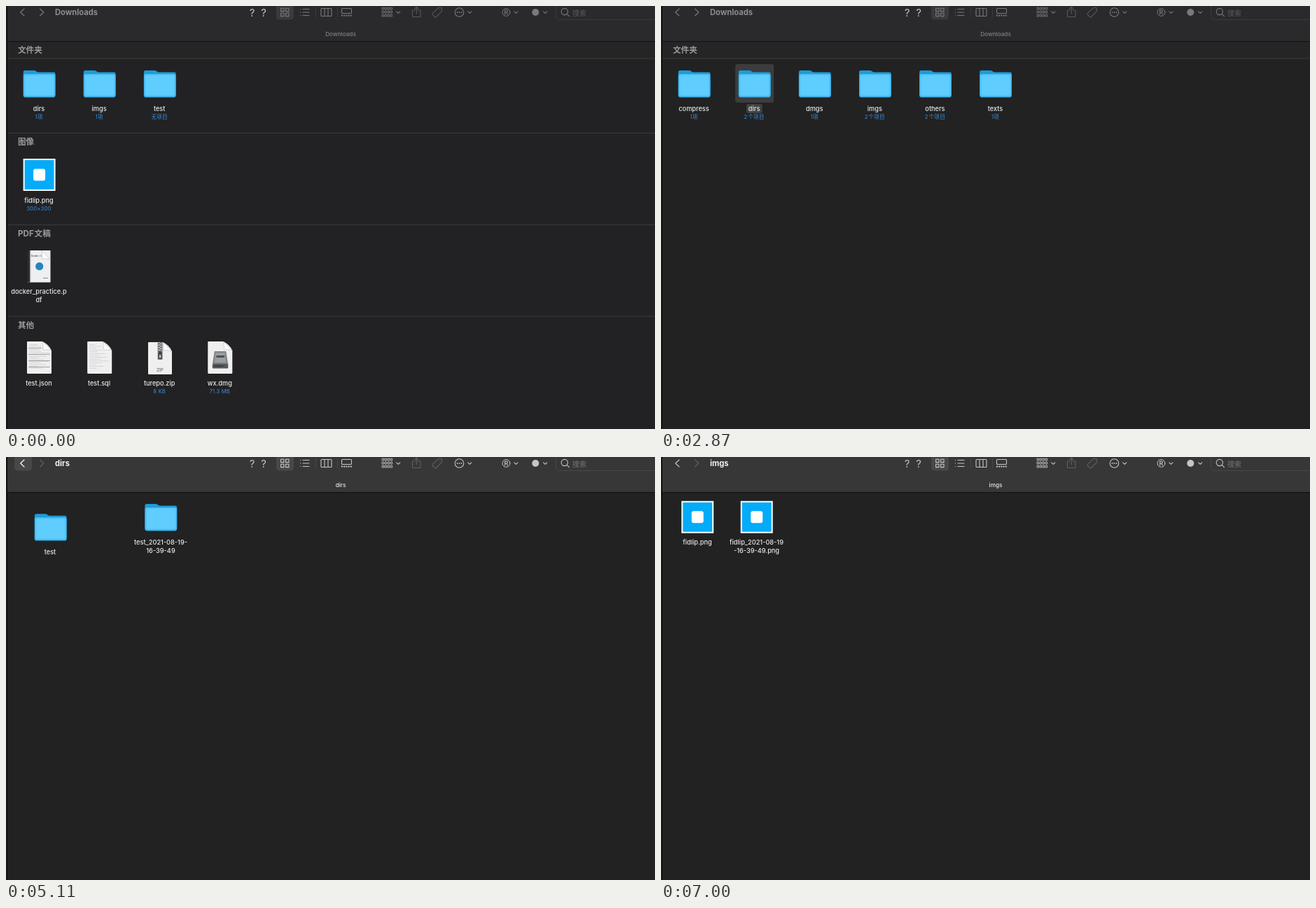
An HTML page that plays this animation: 927 px wide and 604 px high, repeating every 8000 ms.

```html
<!DOCTYPE html>
<html lang="zh-CN">
<head>
<meta charset="utf-8">
<style>
html, body { margin: 0; width: 100%; height: 100%; overflow: hidden; background: #222; }
svg { display: block; --bar: #2a2a2c; --ink: #7a7a7c; --title: #8c8c8e; --path: #808082; --off: #58585a; --box: #3a3a3c; --rule: #3b3b3d; --hint: #5a5a5c; }
svg.active { --bar: #373737; --ink: #c6c6c6; --title: #f2f2f2; --path: #e8e8e8; --off: #616161; --box: #484848; --rule: #484848; --hint: #757575; }
text { font: 500 9.2px Inter, "Noto Sans CJK SC", "Noto Sans CJK", sans-serif; fill: #e9e9e9; }
.mid { text-anchor: middle; }
.sub { font-size: 7.7px; font-weight: 400; letter-spacing: .15px; fill: #3a8ee0; }
.head { font-size: 11.6px; font-weight: 700; fill: #9b9b9b; }
.title { font-size: 11.2px; font-weight: 700; fill: var(--title); }
.path { font-size: 8.2px; fill: var(--path); }
.ask { font-size: 15px; font-weight: 400; fill: #c4c4c4; }
.hint { font-size: 10px; font-weight: 400; fill: var(--hint); }
.tiny { font-size: 3px; fill: #333; }
.icon { fill: none; stroke: var(--ink); stroke-width: 1.1; stroke-linecap: round; stroke-linejoin: round; }
.off { stroke: var(--off); }
.solid { fill: var(--ink); stroke: none; }
</style>
</head>
<body>
<svg id="stage" width="927" height="604" viewBox="0 0 927 604"></svg>
<script>
const stage = document.getElementById('stage');
const LOOP = 8000;
const colX = i => 47 + 86.1 * i;

const rect = (x, y, w, h, fill, r = 0) =>
  `<rect x="${x}" y="${y}" width="${w}" height="${h}" rx="${r}" fill="${fill}"/>`;
const text = (x, y, s, cls = 'mid') => `<text x="${x}" y="${y}" class="${cls}">${s}</text>`;
const icon = (d, cls = '') => `<path class="icon ${cls}" d="${d}"/>`;
const at = (x, y, s) => `<g transform="translate(${x} ${y})">${s}</g>`;
const repeat = (n, f) => Array.from({ length: n }, (_, i) => f(i)).join('');

// Icons are drawn from their own top left corner.
const folder = (x, y) => at(x, y,
  `<path d="M0 35V2.5Q0 0 2.5 0H15Q17 0 18.5 1.3T22 2.6H43.3Q45.8 2.6 45.8 5V35Z" fill="#1f9bd6"/>` +
  rect(0, 5, 45.8, 33.4, '#35a8e2', 2.8) +
  rect(.4, 5, 45, 32.6, '#48b9f0', 2.6) +
  rect(1.4, 6, 43, 30.6, '#56c5f9', 2.4) +
  rect(2.6, 7.2, 40.6, 28.2, '#5fceff', 2));

const picture = (x, y) => at(x, y,
  rect(0, 0, 46, 46, '#f4f8fa') + rect(2.1, 2.1, 41.8, 41.8, '#03abf9') +
  rect(14.5, 14.5, 17, 17, '#fff', 3));

const curl = w => `<path d="M${w - 13} 0Q${w - 11} 8 ${w - 12} 12Q${w - 5} 11 ${w} 13Z" fill="#fdfdfd" stroke="#bbb" stroke-width=".6"/>`;

const page = (x, y, inner, w = 35) => at(x, y,
  `<path d="M0 1Q0 0 1 0H${w - 13}Q${w - 4} 4 ${w} 13V45Q${w} 46 ${w - 1} 46H1Q0 46 0 45Z" fill="#efefef"/>` +
  inner + curl(w));

const lines = (gap, color, width) => repeat(Math.floor(38 / gap), i => {
  const y = 4 + i * gap;
  const room = y < 14 ? 17 : 29;
  return rect(3, y, Math.min(room, width(i)), .8, color);
});

const jsonDoc = (x, y) => page(x, y,
  lines(2.4, '#cfcbcb', i => 12 + i * 7 % 18) + repeat(4, i => rect(2, 9 + i * 9, i ? 31 : 19, .9, '#a09c9c')));
const sqlDoc = (x, y) => page(x, y, lines(2.6, '#cfccd2', i => 8 + i * 11 % 20));

const zipDoc = (x, y) => page(x, y,
  rect(13.6, 0, 7, 25, '#777', 1) +
  repeat(10, i => rect(i % 2 ? 17 : 14.4, i * 1.8, 2.8, 1, '#d4d4d4')) +
  rect(14.6, 13, 5, 11, '#444', 1.5) + rect(16, 18, 2.2, 4.5, '#ccc', 1) +
  `<text x="17" y="41.5" class="mid" style="font-size:6.5px;fill:#707070">ZIP</text>`, 34);

const diskDoc = (x, y) => page(x, y,
  `<path d="M9.5 14H26L29 33H6.5Z" fill="#7f8386"/>` +
  `<path d="M11 16H24.5L26 30H9.5Z" fill="#9a9ea1"/>` +
  rect(12, 20, 12, 3, '#4c5054', 1) + rect(6.5, 32, 22.5, 6.5, '#55595c', 1.5) +
  rect(9, 34.5, 13, 1.2, '#2e3133'));

const book = (x, y) => at(x, y,
  rect(0, 0, 32.5, 45.6, '#eeeff0') +
  rect(0, 0, 3.5, 45.6, '#2c2e30') + rect(3.5, 0, .8, 45.6, '#bbb') +
  text(5, 9, 'Docker 入门', 'tiny') +
  `<circle cx="16.7" cy="22.7" r="5.6" fill="#2585bd"/>` +
  rect(22, 39, 7, 1, '#888') + curl(32.5));

const label = (x, y, name, sub) => text(x, y, name) + (sub ? text(x, y + 11.2, sub, 'mid sub') : '');

const folders = (list, picked, tint) => list.map(([name, sub], i) => {
  const x = colX(i), on = name === picked;
  return (on ? rect(x - 27, 83, 55, 55, '#3c3c3c', 3) + rect(x - 11, 140, 22.5, 13, tint, 2.5) : '') +
    folder(x - 22.3, 92) + label(x, 150, name, sub);
}).join('');

const header = rect(2, 51, 925, 24, '#252525') + rect(2, 74.5, 925, 1, '#3c3c3c') + text(17, 67, '文件夹', 'head');
const section = (y, name) => rect(2, y, 925, 1, '#3a3a3a') + text(17, y + 17, name, 'head');

const files =
  section(181, '图像') + picture(24.6, 218) + label(47, 280.5, 'fidlip.png', '300×300') +
  section(312, 'PDF\u200a文稿') + book(31, 349) + text(47, 411, 'docker_practice.p') + text(47, 423, 'df') +
  section(442.5, '其他') +
  jsonDoc(30, 479) + label(47, 542, 'test.json') +
  sqlDoc(116.2, 479) + label(133, 542, 'test.sql') +
  zipDoc(203, 480) + label(219.2, 542, 'turepo.zip', '8 KB') +
  diskDoc(288.3, 479) + label(305.3, 542, 'wx.dmg', '71.3 MB');

const down = x => icon(`M${x - 2.6} 7.8l2.6 2.6l2.6 -2.6`);

function toolbar({ title, press, glow, noForward, usable }) {
  const off = usable ? '' : 'off';
  return rect(0, 0, 927, 50.2, 'var(--bar)') + rect(0, 50.2, 927, 1, '#101010') +
    (press ? rect(12, -4, 25, 23.5, 'var(--box)', 4.5) : '') +
    `<g${glow ? ' style="--ink:#fff"' : ''}>${icon('M26 4l-5.3 5l5.3 5')}</g>` +
    icon('M48.5 4l5.3 5l-5.3 5', noForward ? 'off' : '') +
    text(70, 13, title, 'title') +
    text(351.5, 14.8, '?', 'mid ask') + text(368, 14.8, '?', 'mid ask') +
    rect(386, -4, 25, 23.5, 'var(--box)', 4.5) +
    icon('M392.6 3.2h4.4v4.4h-4.4zM399.6 3.2h4.4v4.4h-4.4zM392.6 10.2h4.4v4.4h-4.4zM399.6 10.2h4.4v4.4h-4.4z') +
    icon('M420.5 4.5h.2M424 4.5h9M420.5 9h.2M424 9h9M420.5 13.5h.2M424 13.5h9') +
    rect(442, 2, 1, 14, 'var(--rule)') + rect(473, 2, 1, 14, 'var(--rule)') +
    icon('M451 3.5h13q1 0 1 1v9q0 1 -1 1h-13q-1 0 -1 -1v-9q0 -1 1 -1zM455 3.5v11M460 3.5v11') +
    icon('M480.5 3.5h12q1 0 1 1v5q0 1 -1 1h-12q-1 0 -1 -1v-5q0 -1 1 -1z') +
    repeat(5, i => `<rect class="solid" x="${479 + i * 3.2}" y="12.6" width="2" height="2"/>`) +
    repeat(12, i => `<rect class="icon" style="stroke-width:.9" x="${537.5 + i % 4 * 4}" y="${2.2 + (i >> 2) * 5}" width="2.2" height="2.8"/>`) +
    down(560.3) +
    icon('M584 6h-2.5q-1 0 -1 1v7.5q0 1 1 1h9.5q1 0 1 -1v-7.5q0 -1 -1 -1h-2.5M586.3 11v-9.5M583.6 4l2.7 -2.6l2.7 2.6', off) +
    icon('M609.3 10.4l7.6 -7.3q.6 -.6 1.4 -.6h3.2q1 0 1 1v3.2q0 .8 -.6 1.4l-7.4 7.4q-1 .9 -2 0l-3.2 -3.2q-.9 -1 0 -1.9zM619.6 5.3h.2', off) +
    '<circle class="icon" cx="647.5" cy="9" r="6.3"/>' +
    repeat(3, i => `<circle class="solid" cx="${644.5 + i * 3}" cy="9" r=".9"/>`) + down(662.3) +
    '<circle class="icon" style="stroke-width:1" cx="714.5" cy="9" r="5.4"/>' +
    icon('M712.7 12v-6h2q1.8 0 1.8 1.6t-1.8 1.6h-2m2 0l1.9 2.8') + down(728.5) +
    '<circle class="solid" cx="756.3" cy="9" r="5"/>' + down(770.2) +
    '<rect x="785.5" y="-8.5" width="160" height="28" rx="5" fill="none" stroke="var(--rule)"/>' +
    '<circle class="icon" cx="797.8" cy="8" r="4.6"/>' + icon('M801.2 11.4l3.2 3.3') +
    text(809, 13.6, '搜索', 'hint') +
    text(478, 43, title, 'mid path');
}

const one = '1项', two = '2\u200a个项目';
const first = [['dirs', one], ['imgs', one], ['test', '无项目']];
const sorted = [['compress', one], ['dirs', one], ['dmgs', one], ['imgs', one], ['others', two], ['test', '无项目'], ['texts', one]];
const moved = sorted.filter(([name]) => name !== 'test');
const counted = moved.map(([name, sub]) => [name, /dirs|imgs/.test(name) ? two : sub]);

const GRAY = '#434343', BLUE = '#0a58cf';
const home = (list, picked, tint) => header + folders(list, picked, tint);
const collapse = text(922, 66, '折叠', 'head').replace('class', 'style="font-size:9px" class');
const dirs = folder(40.8, 81.2) + text(63, 139, 'test') +
  folder(198.4, 67) + text(221, 125, 'test_2021-08-19-') + text(221, 137.3, '16-39-49');
const imgs = picture(29.2, 62.8) + text(52, 125, 'fidlip.png') +
  picture(113.7, 62.8) + text(136.5, 125, 'fidlip_2021-08-19') + text(136.5, 137.3, '-16-39-49.png');

const idle = { title: 'Downloads' };
const live = { title: 'Downloads', active: true };
const ready = { ...live, usable: true };
const inDirs = { title: 'dirs', active: true, noForward: true };
const inImgs = { ...inDirs, title: 'imgs' };

// [start in ms, toolbar state, window content, window colour]
const scenes = [
  [0, idle, home(first) + files, '#222224'],
  [1260, idle, home(sorted) + files],
  [1330, idle, home(moved)],
  [1610, idle, home(counted)],
  [2870, idle, home(counted, 'dirs', GRAY)],
  [3010, live, home(counted, 'dirs', BLUE)],
  [3080, ready, home(counted, 'dirs', BLUE)],
  [3150, inDirs, dirs],
  [5110, { ...inDirs, press: true, glow: true }, dirs],
  [5320, { ...inDirs, press: true }, dirs],
  [5460, live, home(counted)],
  [5530, live, home(counted) + collapse],
  [6720, live, home(counted, 'imgs', BLUE)],
  [6860, ready, home(counted, 'imgs', BLUE)],
  [7000, inImgs, imgs]
];

const edge = rect(0, 0, 1, 604, '#1f1f1f') + rect(1, 0, 1, 604, '#0b0b0b');
let shown;

function frame() {
  const t = performance.now() % LOOP;
  const scene = scenes.filter(([start]) => start <= t).pop();
  if (scene !== shown) {
    shown = scene;
    const [, bar, content, back = '#222'] = scene;
    stage.setAttribute('class', bar.active ? 'active' : '');
    stage.innerHTML = rect(0, 0, 927, 604, back) + content + toolbar(bar) + edge;
  }
  requestAnimationFrame(frame);
}
frame();
</script>
</body>
</html>
```
